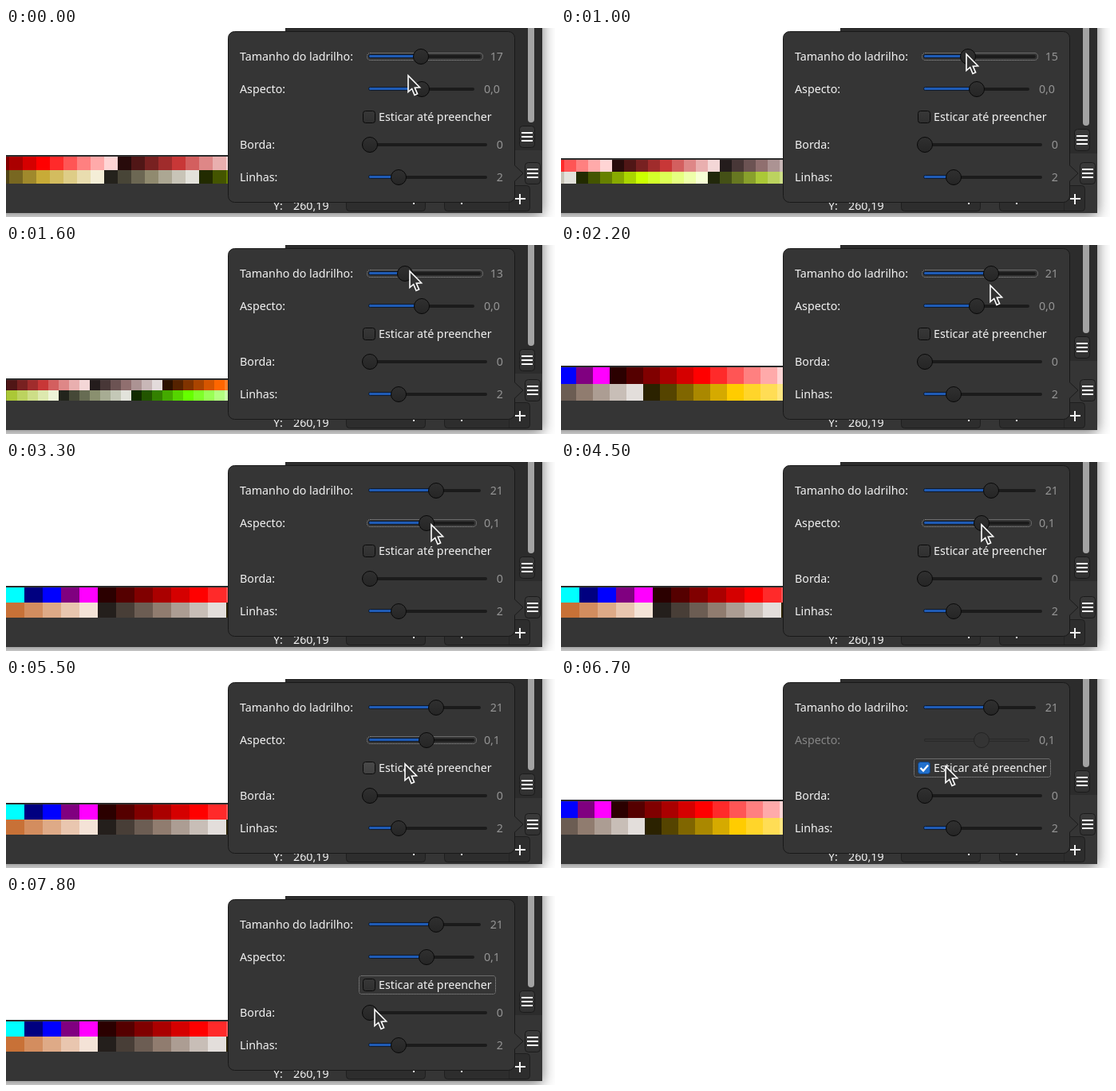
Write an HTML page with a canvas that moves like this. It is 688 by 238 pixels and loops after 8 s.

```html
<!DOCTYPE html>
<html lang="pt">
<head>
<meta charset="utf-8">
<title>Configuração da paleta</title>
<style>
  html, body { margin: 0; width: 100%; height: 100%; overflow: hidden; background: #fff; }
  canvas { display: block; }
</style>
</head>
<body>
<canvas id="stage" width="688" height="238"></canvas>
<script>
const ctx = document.getElementById('stage').getContext('2d');
const LOOP = 8000, TICK = 100;
const PALETTE_LEFT = -506, PALETTE_WIDTH = 1096, PALETTE_BOTTOM = 196;
const FONT = '14.25px "Noto Sans", sans-serif';
const LIGHT = '#f2f2f2', PANEL = '#353535';

const ramp = (t, from, to) => Math.min(1, Math.max(0, (t - from) / (to - from)));
const smooth = (t, from, to) => { const p = ramp(t, from, to); return p * p * (3 - 2 * p); };

// Slider values over time, and where their knobs sit.
const sizeAt = t => Math.round(17 - 5 * smooth(t, 700, 1300) + 9 * smooth(t, 1500, 1900));
const aspectAt = t => Math.round(5 * smooth(t, 3200, 3600) - 4 * smooth(t, 4000, 4600)) / 10;
const sizeKnob = size => Math.round(436.3 + 4.9 * size);
const aspectKnob = aspect => Math.round(521 + 64 * aspect);

// Each move glides the pointer on from wherever the previous one ended.
const move = (from, to, x, y) => ({ from, to, x, y });
const moves = [
  move(0, 500, sizeKnob(17), 32),
  move(700, 1300, sizeKnob(12), 32),
  move(1500, 1900, sizeKnob(21), 32),
  move(2100, 2350, 537, 76),
  move(2500, 2600, aspectKnob(0) + 5, 78),
  move(3200, 3600, aspectKnob(.5) + 2, 78),
  move(4000, 4250, aspectKnob(.1), 78),
  move(5100, 5500, 500, 106),
  move(5500, 5800, 482, 109),
  move(7000, 7800, 462, 142)
];

function pointerAt(t) {
  let x = 504, y = 59;
  for (const m of moves) {
    const p = ramp(t, m.from, m.to);
    x += (m.x - x) * p;
    y += (m.y - y) * p;
  }
  return [Math.round(x), Math.round(y)];
}

// Dark and bright primaries come first, then for each hue
// a vivid, a muted and a greyish ramp of 11, 9 and 7 shades.
function paletteColor(i) {
  const hsl = (h, s, l) => `hsl(${h}, ${s}%, ${l * 100}%)`;
  if (i < 0) return hsl(Math.floor((i + 12) / 2) * 60, 100, i % 2 ? .5 : .25);
  const hue = Math.floor(i / 27) * 24, k = i % 27;
  if (k < 11) return hsl(hue, 100, (k + 1) / 12);
  if (k < 20) return hsl(hue, 56.9, (k - 10) / 10);
  return hsl(hue, 13.3, (k - 19) / 8);
}

function rect(x, y, w, h, fill) {
  ctx.fillStyle = fill;
  ctx.fillRect(x, y, w, h);
}

function box(x, y, w, h, r, fill, stroke) {
  ctx.beginPath();
  ctx.roundRect(x, y, w, h, r);
  if (fill) { ctx.fillStyle = fill; ctx.fill(); }
  if (stroke) { ctx.strokeStyle = stroke; ctx.lineWidth = 1; ctx.stroke(); }
}

function path(d, fill, stroke, width) {
  const shape = new Path2D(d);
  if (fill) { ctx.fillStyle = fill; ctx.fill(shape); }
  ctx.strokeStyle = stroke;
  ctx.lineWidth = width;
  ctx.stroke(shape);
}

function text(str, x, y, color = LIGHT, align = 'left') {
  ctx.font = FONT;
  ctx.textAlign = align;
  ctx.fillStyle = color;
  ctx.fillText(str, x, y);
}

function vertical(y0, y1, from, to) {
  const g = ctx.createLinearGradient(0, y0, 0, y1);
  g.addColorStop(0, from);
  g.addColorStop(1, to);
  return g;
}

function focusRing(x, y, w, h, r) {
  ctx.setLineDash([1, 1]);
  box(x + .5, y + .5, w - 1, h - 1, r, null, '#a0a0a0');
  ctx.setLineDash([]);
}

function menuButton(cx, cy) {
  box(cx - 9.5, cy - 13.5, 19, 27, 4, vertical(cy - 13, cy + 13, '#3a3a3a', '#313131'), '#1b1b1b');
  for (let i = -1; i <= 1; i++) rect(cx - 7, cy - 1 + 5 * i, 14, 2, '#fff');
}

function plus(cx, cy) {
  rect(cx - 6, cy - 1, 13, 2, LIGHT);
  rect(cx - 1, cy - 6, 2, 13, LIGHT);
}

function slider(label, y, right, knob, value, { focused, disabled, valueRight = 623 } = {}) {
  text(label, 293, y + 5, disabled ? '#868686' : LIGHT);
  text(value, valueRight, y + 5, '#949494', 'right');
  if (focused) focusRing(452, y - 5, right - 449, 10, 4);
  box(455, y - 2, right - 455, 4, 2, disabled ? '#292929' : '#1b1b1b');
  if (disabled) box(456, y - 1, right - 457, 2, 1, '#333');
  else if (knob > 460) box(454.5, y - 2.5, knob - 454.5, 4, 2, '#1f5bb5', '#0f1a2b');
  box(knob - 9.5, y - 9.5, 19, 19, 9.5,
      disabled ? '#343434' : vertical(y - 10, y + 10, '#303030', '#252525'),
      disabled ? '#242424' : '#080808');
}

function checkbox(checked, hovered, focused) {
  if (focused) focusRing(442, 100, 172, 24, 3);
  const plain = hovered ? vertical(104, 120, '#4a4a4a', '#404040') : vertical(104, 120, '#383838', '#2f2f2f');
  box(447.5, 104.5, 15, 15, 3, checked ? '#2270cc' : plain, checked ? '#123f78' : '#0a0a0a');
  if (checked) path('M450.5 112l3.5 3.5l6-7', null, '#fff', 2.4);
  text('Esticar até preencher', 467, 117);
}

function pointer(x, y) {
  ctx.save();
  ctx.translate(x, y + 1);
  path('M0 0v20.5l4.7-4l3.3 8l3.6-1.6l-3.3-7.6l6.3-.5z', '#333', '#fff', 1.6);
  ctx.restore();
}

function drawWindow(top) {
  rect(0, 0, 688, 238, '#fff');
  ctx.save();
  ctx.shadowColor = 'rgba(0,0,0,.55)';
  ctx.shadowBlur = 16;
  ctx.shadowOffsetY = 3;
  rect(-40, -40, 712, 273, PANEL);
  ctx.restore();

  rect(0, 0, 350, top - 2, '#fff');
  rect(0, top - 2, 350, 1, '#1d1d1d');
  rect(350, 0, 322, top - 8, '#2c2c2c');
  box(654, -10, 8, top - 33, 4, '#a3a3a3');
  menuButton(653, top - 25);
  menuButton(660, 183);

  text('Y:', 335, 229);
  text('260,19', 360, 229);
  box(426.5, 198.5, 99, 32, 4, '#2d2d2d', '#1e1e1e');
  box(549.5, 198.5, 107, 32, 4, '#2d2d2d', '#1e1e1e');
  rect(630, 199, 1, 31, '#242424');
  for (const x of [511, 571, 644]) plus(x, 215);
}

function drawPalette(tileW, tileH, top) {
  const columns = Math.floor(PALETTE_WIDTH / tileW + 1e-6);
  const edge = c => Math.round(PALETTE_LEFT + c * tileW);
  for (let row = 0; row < 2; row++) {
    for (let c = 0; c < columns; c++) {
      if (edge(c + 1) <= 0 || edge(c) > 280) continue;
      rect(edge(c), top + row * tileH, edge(c + 1) - edge(c), tileH,
           paletteColor(c + row * columns - 27));
    }
  }
}

function drawPopover() {
  box(278.5, 4.5, 359, 215, 8, PANEL, '#191919');
  path('M637 172.5L648 183L637 193.5', PANEL, '#1c1c1c', 1);
}

function draw(t) {
  const size = sizeAt(t), aspect = aspectAt(t);
  const stretched = t >= 6100 && t < 7000;
  const focus = t < 3000 ? 'size' : t < 6000 ? 'aspect' : 'stretch';

  let tileW = Math.round(size * (1 + aspect));
  let tileH = Math.round(size / (1 + aspect));
  if (stretched) {
    tileW = PALETTE_WIDTH / Math.floor(PALETTE_WIDTH / size);
    tileH = size;
  }
  const top = PALETTE_BOTTOM - 2 * tileH;

  drawWindow(top);
  drawPalette(tileW, tileH, top);
  drawPopover();

  slider('Tamanho do ladrilho:', 36, 595, sizeKnob(size), String(size),
         { focused: focus === 'size' });
  slider('Aspecto:', 77, 587, aspectKnob(aspect), aspect.toFixed(1).replace('.', ','),
         { focused: focus === 'aspect', disabled: stretched, valueRight: 619 });
  checkbox(stretched, t >= 5400 && t < 7300, focus === 'stretch');
  slider('Borda:', 147, 603, 456, '0');
  slider('Linhas:', 188, 603, 492, '2');
  pointer(...pointerAt(t));
}

const start = performance.now();
function frame() {
  const t = (performance.now() - start) % LOOP;
  draw(Math.floor(t / TICK) * TICK);
  requestAnimationFrame(frame);
}
frame();
</script>
</body>
</html>
```
